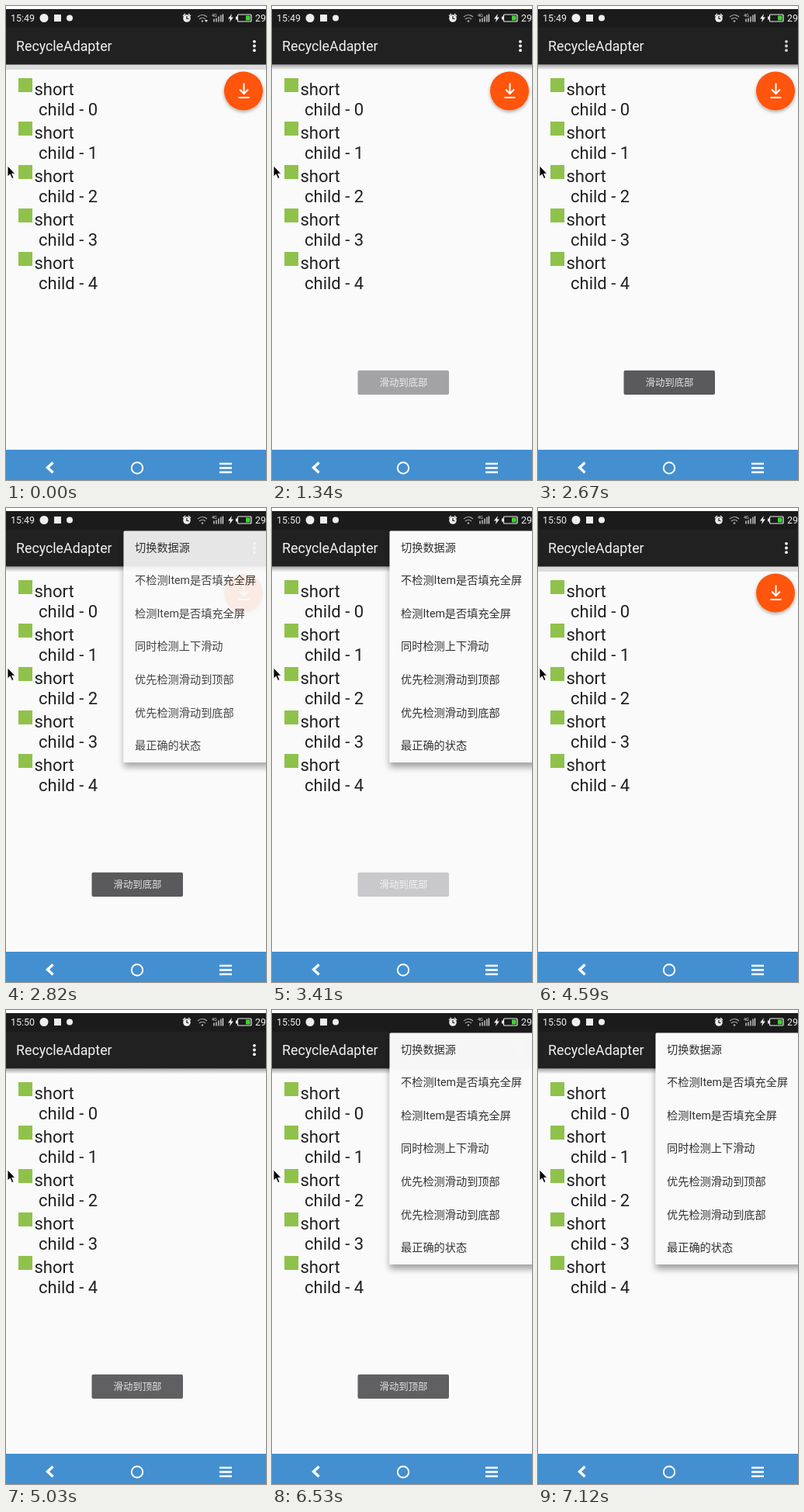
Recreate the animation shown at these times as an HTML page. Size 335 by 611 pixels, loop 8000 ms.

```html
<!DOCTYPE html>
<html lang="zh-CN">
<meta charset="utf-8">
<title>RecycleAdapter</title>
<style>
html, body { margin: 0; width: 100%; height: 100%; overflow: hidden; background: #fff; }
svg { display: block; width: 335px; height: 611px; font-family: Roboto, "Noto Sans CJK SC", "Noto Sans CJK", sans-serif; }
.line { fill: none; stroke: #fff; stroke-width: 2; }
.thin { stroke: #eee; stroke-width: 1.2; }
#rows { font-size: 22px; fill: #202020; }
#items { font-size: 14.2px; fill: #303030; }
</style>
<svg viewBox="0 0 335 611">
  <defs>
    <linearGradient id="fall" x2="0" y2="1">
      <stop stop-opacity=".34"/><stop offset="1" stop-opacity="0"/>
    </linearGradient>
    <filter id="lift" x="-20%" y="-20%" width="140%" height="140%">
      <feDropShadow dx="0" dy="2" stdDeviation="2" flood-opacity=".33"/>
    </filter>
    <filter id="float" x="-15%" y="-10%" width="130%" height="120%">
      <feDropShadow dx="0" dy="6" stdDeviation="4.500" flood-opacity=".36"/>
    </filter>
  </defs>

  <rect y="4" width="335" height="568" fill="#fafafb"/>
  <rect y="75.500" width="335" height="7" fill="url(#fall)"/>
  <rect id="edge" y="76" width="335" height="6" fill="#dcdcdc"/>
  <rect y="4" width="335" height="71.500" fill="#212121"/>
  <rect y="4" width="335" height="24" fill="#1b1b1b"/>

  <!-- status bar -->
  <g fill="#eee">
    <text id="clock" x="6" y="20" font-size="12.4"></text>
    <circle cx="49" cy="15.5" r="5.5"/>
    <rect x="62" y="11" width="9" height="9"/>
    <circle cx="82" cy="15.5" r="4"/>
    <circle cx="233" cy="16" r="4.8"/>
    <path class="line thin" d="M228 13l3-3M238 13l-3-3"/>
    <path d="M233 13v3.5h2.5" fill="none" stroke="#1b1b1b" stroke-width="1.2"/>
    <path class="line thin" style="stroke:#aaa" d="M247 14q6-5 12 0M249 17q4-3.500 8 0"/>
    <circle cx="253" cy="19.500" r="1.300" fill="#aaa"/>
    <path id="wifi" d="M256 18h4l-2 3z"/>
    <text x="265" y="14" font-size="5.500">4G</text>
    <path class="line thin" d="M268 20.500v-4M271 20.500v-5M274 20.500v-7M277 20.500v-9M279.500 20.500v-10"/>
    <path d="M291 10l-5 6.500h3l-1 4.500 5-6.500h-3z"/>
    <rect class="line thin" x="298.500" y="11" width="17.500" height="9" rx="1"/>
    <rect x="296" y="13.500" width="2" height="4"/>
    <rect x="309" y="12.500" width="5.500" height="6" fill="#3fd431"/>
    <text x="321" y="20" font-size="12.4">29%</text>
  </g>

  <!-- app bar -->
  <text x="13" y="58" font-size="17.800" fill="#f2f2f2">RecycleAdapter</text>
  <g id="dots" fill="#fff">
    <circle cx="320" cy="45.800" r="1.900"/><circle cx="320" cy="51.500" r="1.900"/><circle cx="320" cy="57.200" r="1.900"/>
  </g>

  <g id="rows"></g>

  <g id="button">
    <circle cx="306" cy="109.500" r="25" fill="#ff5408" filter="url(#lift)"/>
    <path class="line" d="M306.500 99.500v13M301 107.500l5.500 5.500 5.500-5.500M299.500 118h14"/>
  </g>

  <path d="M2 206v14l3.200-3 2.500 5.500 2.300-1-2.400-5.300h4.200z" fill="#000" stroke="#fff" stroke-width=".9"/>

  <g id="menu">
    <rect x="151.500" y="29.500" width="190" height="298.500" rx="1.500" fill="#fafafa" filter="url(#float)"/>
    <g id="items"></g>
  </g>

  <g id="toast">
    <rect x="110.500" y="469.700" width="117.500" height="31.300" rx="2" fill="#5a595b"/>
    <text id="message" x="169.500" y="490" font-size="12.400" text-anchor="middle" fill="#e4e4e4"></text>
  </g>

  <!-- navigation bar -->
  <rect y="572" width="335" height="39" fill="#448fd0"/>
  <path class="line" style="stroke-width:3.400" d="M60.500 588.500l-7 6.500 7 6.500"/>
  <circle class="line" cx="169" cy="595.500" r="7.200"/>
  <path class="line" style="stroke-width:2.500" d="M275 590h16M275 595.500h16M275 601h16"/>
</svg>
<script>
const $ = id => document.getElementById(id);
const LOOP = 8000;

$("rows").innerHTML = [0, 1, 2, 3, 4].map(i => `<g transform="translate(0 ${i * 56})">
  <rect x="16" y="93" width="18" height="18" fill="#8fc24a"/>
  <text x="36.500" y="114.500">short</text><text x="42" y="140.500">child - ${i}</text></g>`).join("");

$("items").innerHTML = ["切换数据源", "不检测Item是否填充全屏", "检测Item是否填充全屏", "同时检测上下滑动",
  "优先检测滑动到顶部", "优先检测滑动到底部", "最正确的状态"]
  .map((s, i) => `<text x="166" y="${55.6 + i * 42.6}">${s}</text>`).join("");

// Opacity steps as [start time, value]
const tracks = {
  edge: [[0, 1], [1040, .5], [1190, 0], [4440, .5], [4590, 1], [4730, 0]],
  wifi: [[0, 1], [890, 0]],
  dots: [[0, 1], [2670, .8], [3700, 1]],
  button: [[0, 1], [4730, 0]],
  menu: [[0, 0], [2820, .91], [2970, 1], [3700, .2], [3850, 0], [6530, .985], [6680, 1]],
  toast: [[0, 0], [1190, .2], [1340, .54], [1480, .85], [1630, 1], [3260, .7], [3410, .3], [3550, 0],
    [4730, .35], [4880, .72], [5030, .96], [6820, .7], [6970, .3], [7120, 0]]
};
const valueAt = (track, t) => track.findLast(([start]) => t >= start)[1];

function draw(now) {
  const t = now % LOOP;
  for (const id in tracks) $(id).setAttribute("opacity", valueAt(tracks[id], t));
  $("clock").textContent = t < 2970 ? "15:49" : "15:50";
  $("message").textContent = t < 4000 ? "滑动到底部" : "滑动到顶部";
}

const begin = performance.now();
function tick() {
  draw(performance.now() - begin);
  requestAnimationFrame(tick);
}
tick();
</script>
</html>
```
